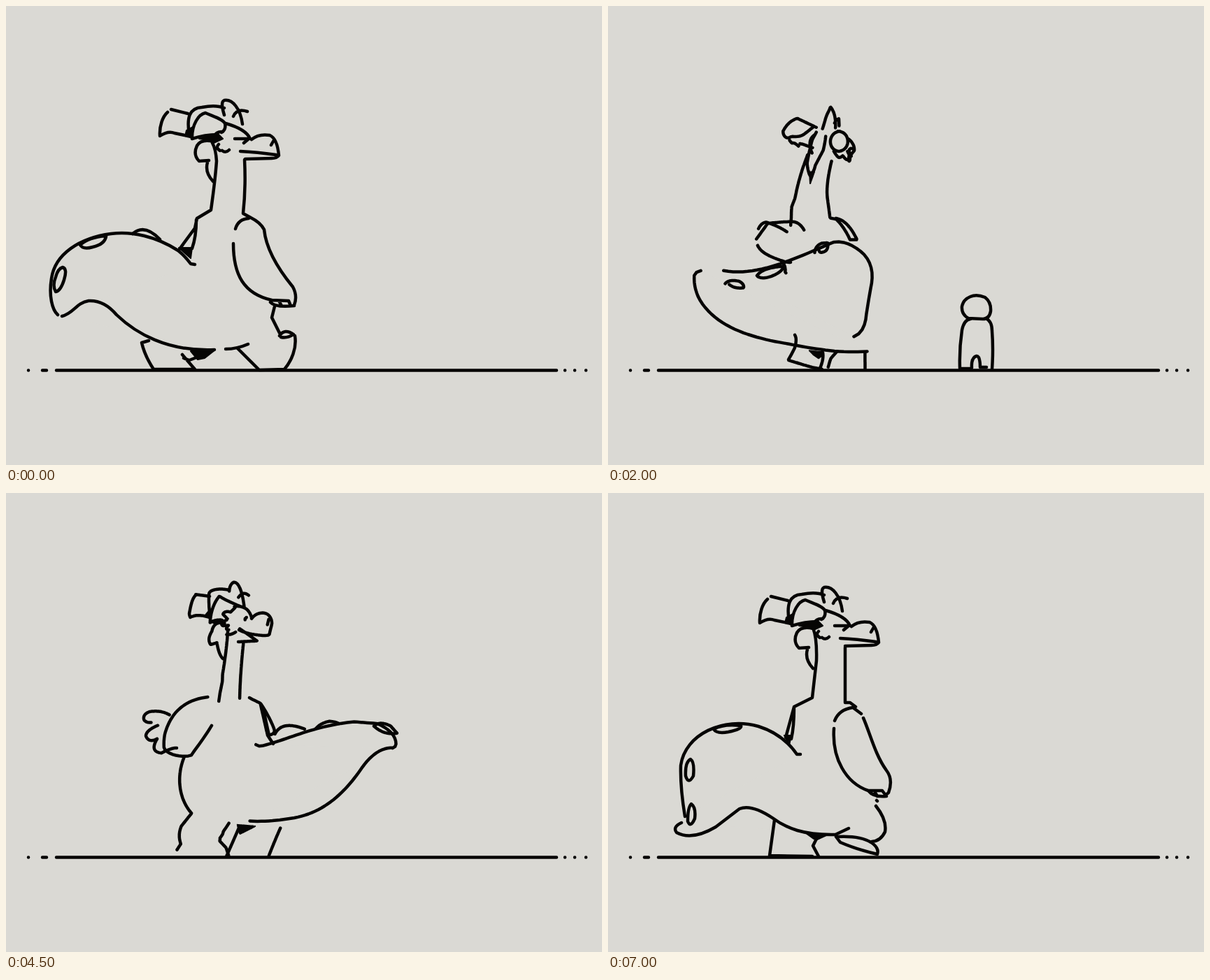
An HTML page that plays this animation: 852 by 657 pixels, repeating every 7160 ms.

```html
<!DOCTYPE html>
<html lang="en">
<head>
<meta charset="utf-8">
<title>Dragon walk</title>
<style>
html, body { margin: 0; height: 100%; overflow: hidden; background: #dad9d4; }
svg { display: block; width: 100%; height: 100%; fill: none; stroke: #060504; stroke-width: 4.5; stroke-linecap: round; stroke-linejoin: round; }
#tail { fill: #dad9d4; }
#ink { fill: #060504; stroke-width: 2; }
</style>
</head>
<body>
<svg viewBox="0 0 852 657">
  <g id="human">
    <path d="M-9,-105Q0,-109 12,-104Q21,-97 20,-84Q18,-73 9,-73L-12,-74Q-22,-80 -21,-91Q-19,-101 -9,-105Z"/>
    <path d="M-9,-73Q-18,-72 -21,-57Q-25,-30 -24,-2L-8,-2M13,-74Q22,-70 22,-56Q24,-30 22,-1"/>
    <path id="feet" d="M-7,-3Q-8,-18 0,-20Q5,-20 5,-4L14,-4"/>
  </g>
  <path id="tail"/><path id="line"/><path id="ink"/>
  <path d="M32,521.5L32.1,521.5M52,521.5L58,521.5M72,521.5L787,521.5M799,521.5L799.1,521.5M813,521.5L813.1,521.5M829,521.5L829.1,521.5"/>
</svg>
<script>
const $ = id => document.getElementById(id);
const STEP = 1000 / 6, LOOP = 7160, SAMPLES = 48;

// Profile head, facing right
const HEAD = 'M260,154L236,148M231,152C224,158 219,172 220,186Q232,178 241,182L260,186' +
  'M262,184C258,160 262,146 280,145Q300,141 312,146M312,156C309,146 307,137 312,135C324,133 335,147 338,169' +
  'M325,158Q330,146 345,151M266,188C266,170 275,155 285,153C296,158 310,162 313,168Q315,177 308,181' +
  'M266,190Q285,184 302,184M314,168C328,172 344,178 349,190M310,180Q301,179 297,187M304,198Q299,203 306,207M309,207Q314,211 319,206' +
  'M296,194Q279,190 273,200Q267,213 276,222L290,221M288,224Q284,238 296,251';
const HEAD_INK = 'M258,178L267,173L266,189L256,186ZM276,190L304,184L310,190L297,196L290,192Z';
const STERN = 'M327,190L345,190M340,196L346,191' +
  'M351,191C357,186 365,183 377,185C386,189 389,203 390,214Q387,218 380,218L342,219M335,208Q358,209 386,213M379,199L383,192';

const place = (d, side, dx, dy) =>
  d.replace(/(-?[\d.]+),(-?[\d.]+)/g, (_, x, y) => `${dx + side * x},${dy + +y}`);

function pose(parts, side, dx, dy) {
  if (side) {
    parts.head = place(HEAD, side, dx, dy);
    parts.headInk = place(HEAD_INK, side, dx, dy);
    parts.face = place(STERN, side, dx, dy);
  }
  for (const key in parts) parts[key] = parts[key].split(/(?=M)/);
  return parts;
}

const contact = pose({
  tail: 'M270,370L264,369Q256,358 246,350C215,330 180,322 150,326C105,332 70,355 65,390C61,415 66,435 74,442' +
    'M80,444C97,440 100,425 118,422C135,421 148,430 158,442C185,468 230,495 298,492M314,491Q330,491 346,484',
  spot: 'M143,330Q141,341 124,345Q110,349 106,342Q118,331 143,329ZM81,374Q88,376 83,392Q78,408 71,409Q66,400 71,388Q74,376 81,374Z' +
    'M181,326Q198,311 220,334',
  neck: 'M295,196Q300,205 301,222C299,250 296,270 293,292L273,304L270,318L248,348M341,220Q343,260 339,297L350,303Q364,310 369,320M272,306Q272,330 266,347',
  arm: 'M328,319Q332,305 347,304M325,340C325,385 340,412 380,421M369,320C372,350 392,380 410,402Q417,415 412,428' +
    'M378,424Q385,432 412,429M380,421L404,422L407,429M390,422L394,429',
  leg: 'M384,430L380,446L391,468M413,472C416,490 408,508 398,520L362,521L331,490M391,472Q398,461 411,470Q402,476 393,474' +
    'M204,479L194,482Q198,500 211,520L270,520L252,499M254,504L262,507L275,502',
  ink: 'M264,494L298,493L284,504L274,506ZM247,346L266,346L264,361Z'
}, 1, 0, 0);

const crouch = pose({
  tail: 'M274,376Q240,347 205,346C170,344 150,354 111,370' +
    'M104,371Q85,365 48,364C36,368 36,400 58,418C80,438 120,436 160,443C200,455 225,490 265,495L287,497',
  spot: 'M131,361Q140,339 172,345M62,363Q70,358 95,366L97,372Q75,377 62,365ZM208,345Q228,329 246,353',
  neck: 'M298,196Q301,210 299,250Q297,285 291,310L270,322L269,350L262,367M339,222Q345,260 341,310L352,316',
  arm: 'M335,324L350,317Q365,318 370,342M329,334Q299,365 318,416M370,342Q364,370 365,405Q355,442 331,444' +
    'M315,425L326,424L330,430L328,440L317,437ZM323,428L319,436',
  leg: 'M370,382Q392,402 383,445Q374,480 356,503L369,519M302,491Q330,502 348,519M331,474Q310,470 295,472Q290,480 287,499' +
    'M245,490L284,519M268,500L296,520',
  ink: 'M244,489L266,495L290,496L288,502L256,500Z'
}, 1, 4, 0);

const passing = pose({
  tail: 'M276,370L270,371Q250,350 230,340C190,322 150,324 130,336Q95,360 70,408' +
    'M56,431Q36,434 40,450Q50,460 80,457C105,452 125,430 152,434C180,440 205,480 266,482',
  spot: 'M103,373Q106,355 132,346Q137,355 120,368Q108,376 103,373ZM59,432Q61,412 80,406Q84,419 67,432Q62,435 59,432ZM173,325Q192,313 215,332',
  neck: 'M293,205Q299,220 297,245Q295,270 291,291L273,302L271,338L259,361M350,228Q344,228 344,235L344,292L352,299',
  arm: 'M333,312Q340,302 352,299Q372,305 377,325M332,321Q321,360 330,393M377,325Q377,350 382,385Q386,410 375,429' +
    'M329,393Q332,412 352,420L366,422L368,428M350,420L366,429',
  leg: 'M380,348C394,380 392,440 372,463Q360,476 346,475M316,462L305,464Q294,470 292,495Q287,510 295,518Q315,524 333,517Q345,500 345,480Q340,462 316,461' +
    'M377,455Q374,490 363,506L342,510M235,481Q238,505 246,520',
  ink: 'M273,484L294,483L291,498Z'
}, 1, -5, 8);

const lift = pose({
  tail: 'M275,374L270,374Q250,345 215,334C165,320 110,345 104,390Q103,420 110,463' +
    'M105,472Q92,478 98,486Q120,498 154,478L188,452Q205,445 235,465C255,480 280,490 325,489M325,489L344,480',
  spot: 'M151,338Q165,330 190,333Q192,338 172,342Q155,345 151,338ZM118,381Q124,385 122,405Q115,418 111,405Q110,385 118,381Z' +
    'M119,445Q126,450 124,466Q118,480 114,470Q114,450 119,445Z',
  neck: 'M293,193Q299,208 298,240L292,293L266,306L254,350M339,221L339,300L346,300L354,306M266,306Q266,335 262,352',
  arm: 'M324,326Q330,310 350,307L362,316M323,337C320,380 340,415 372,426M365,322C375,345 382,375 398,397Q408,410 401,429L396,433' +
    'M372,426Q380,436 398,434L392,426ZM382,429L385,434',
  leg: 'M384,440L385,441M326,492Q360,490 376,500Q388,508 385,517Q355,510 332,500ZM383,448Q399,468 396,485Q390,498 377,499' +
    'M238,468L231,519L292,520M298,495L293,505L301,520',
  ink: 'M283,487L312,490L299,496L294,495ZM252,347L262,347L259,361Z'
}, 1, -3, 0);

const windup = pose({
  tail: 'M145,378C200,390 260,370 345,335Q370,330 400,353Q425,375 418,413L414,455Q414,485 396,492' +
    'M138,379Q128,382 130,390C138,435 185,470 250,486Q310,499 386,494',
  spot: 'M326,350Q326,340 336,336L345,336Q345,350 334,352Q328,354 326,350ZM241,389Q248,376 280,372Q276,383 258,390Q246,394 241,389Z' +
    'M160,406Q165,399 181,403Q189,408 187,414Q170,415 160,406Z',
  head: 'M304,174L273,159Q258,164 250,181Q250,190 258,193L266,190Q280,192 288,186L304,174M264,196Q272,192 274,200' +
    'M276,196Q280,207 288,210M305,176Q313,158 316,142Q324,152 322,172M323,166Q325,161 329,160L327,172' +
    'M303,176L296,190L290,214L285,235Q285,250 288,256Q294,250 295,238L306,210L311,184M300,180Q284,190 289,212',
  face: 'M328,174C349,174 350,206 328,208C308,206 308,176 328,174ZM344,186Q354,195 353,206L345,216L341,208' +
    'M317,208Q320,227 326,215Q334,226 338,210Q341,227 346,214M351,200Q337,198 340,212',
  neck: 'M283,213Q258,255 261,302M316,219Q306,250 308,270L313,300L326,302M326,302Q343,305 356,333L346,333Q338,315 326,303',
  arm: 'M270,318Q260,303 245,305L203,306L183,330M194,314Q204,297 212,297Q232,298 244,304M185,341Q195,356 248,351M236,354L243,373',
  leg: 'M248,487Q251,492 245,505L234,520L294,520M308,497Q306,508 294,520M327,498L320,520M390,497L383,520',
  ink: 'M296,494L312,495L306,505ZM288,235L295,235L289,252Z'
});

const swing = pose({
  tail: 'M332,347Q350,345 372,336Q400,325 403,295Q394,265 405,254' +
    'M411,251C460,258 488,310 488,365Q485,420 449,447M440,455Q425,468 390,477Q340,490 302,480',
  spot: 'M398,272Q390,285 399,297M374,335Q378,325 396,323L390,330Z',
  neck: 'M291,212Q296,250 315,300L334,301L342,325L354,338M251,222Q253,265 259,300',
  arm: 'M258,300L172,308Q165,304 152,303L132,307Q118,322 117,338Q130,362 150,362L168,356L240,363M145,304Q154,300 156,308',
  leg: 'M240,363C232,400 235,440 271,463M270,462L258,460M268,463L245,485Q238,492 243,502L234,520L388,522' +
    'M328,488L299,521M334,490Q322,502 315,521M414,473L388,524',
  ink: 'M330,487L360,484L340,494L330,496Z'
}, -1, 589, 4);

const smile = pose({
  tail: 'M362,365L368,368C420,355 450,335 515,334L555,341Q590,360 586,384L580,388' +
    'M580,388Q545,386 515,418C470,465 430,480 385,478Q350,478 330,474',
  spot: 'M382,361Q395,336 432,348M456,340Q472,325 495,332M526,336Q535,328 550,336L559,346Q540,349 526,336Z',
  head: 'M284,151L256,149M256,149Q247,152 242,176L244,181Q262,176 281,180M286,188Q281,162 285,147Q292,138 327,142' +
    'M327,142Q327,132 334,130Q351,134 357,165M345,152Q354,143 366,150M286,188Q288,165 305,151Q325,160 352,165' +
    'M286,189Q300,184 313,186M336,166Q348,163 360,168Q369,173 372,182M336,166L328,173Q317,170 314,176L321,183' +
    'M321,183Q308,188 314,192L324,191Q317,198 325,198M322,206Q331,206 339,202' +
    'M316,189Q294,186 290,201Q281,212 289,220L302,217M302,219Q304,232 313,238',
  headInk: 'M276,179L285,172L286,184ZM290,187L312,184L314,188L296,190Z',
  face: 'M359,180L360,183M359,181L360,184' +
    'M372,182C378,176 390,171 403,175Q413,180 413,190L409,206Q370,205 349,196M349,196L384,216L356,217M404,191L407,183',
  neck: 'M322,198Q318,235 295,294M356,216Q350,260 348,296M348,296L364,304Q378,325 384,342Q384,348 374,349L364,306M374,349L382,361',
  arm: 'M294,294Q262,298 250,325Q242,350 246,374Q255,384 284,381Q298,350 304,330M250,323Q235,315 215,318Q203,322 205,331Q208,336 217,335' +
    'M217,335Q200,342 200,350Q204,360 216,354M216,354Q205,372 222,374Q238,366 244,367',
  leg: 'M257,384C245,410 250,440 264,458M264,459L248,480Q242,495 248,510L242,520M328,475Q322,490 312,494L314,505L306,520' +
    'M333,480L318,520M403,478L387,519',
  ink: 'M331,473L356,476L334,487ZM364,308L370,316L377,348L373,348Z'
});

// [step, pose, sway x, sway y] where the sway peaks midway to the next key
const KEYS = [
  [0, contact, 0, 0], [1, crouch, -4, 0], [4, passing, 0, -12], [7, lift, 0, 0],
  [8, contact, 0, 0], [9, crouch, 0, 4], [13, windup, -6, 2], [15, windup, 0, 0],
  [16, windup, 0, 0], [20, swing, 0, 0], [24, swing, 0, -6], [28, smile, 5, -7],
  [32, smile, -3, 3], [34, smile, 0, 0], [39, passing, 0, -12], [42, lift, 0, 0], [43, contact, 0, 0]
];

const probe = document.createElementNS('http://www.w3.org/2000/svg', 'path');
const cache = new Map();
function sample(d) {
  if (!cache.has(d)) {
    probe.setAttribute('d', d);
    const length = probe.getTotalLength();
    cache.set(d, Array.from({ length: SAMPLES + 1 }, (_, i) => probe.getPointAtLength(length * i / SAMPLES)));
  }
  return cache.get(d);
}

function blend(a, b, u, sx, sy) {
  if (!a || !b) {
    if (u < .5 ? !a : !b) return '';
    a = b = a || b;
  }
  const from = sample(a), to = sample(b);
  return 'M' + from.map((p, i) => {
    const x = p.x + (to[i].x - p.x) * u, y = p.y + (to[i].y - p.y) * u;
    const w = Math.min(1, Math.max(0, (500 - y) / 300));
    return `${(x + sx * w).toFixed(1)},${(y + sy * w).toFixed(1)}`;
  }).join('L');
}

function drawDragon(step) {
  const i = KEYS.findLastIndex(key => key[0] <= step);
  const [start, a, sx, sy] = KEYS[i], [end, b] = KEYS[i + 1];
  const p = (step - start) / (end - start), u = p * p * (3 - 2 * p), arc = Math.sin(Math.PI * p);
  const still = p === 0 || (a === b && !sx && !sy);
  const out = { tail: '', line: '', ink: '' };
  for (const part of Object.keys({ ...a, ...b })) {
    const layer = part === 'tail' ? 'tail' : /ink/i.test(part) ? 'ink' : 'line';
    const from = a[part] || [], to = b[part] || [];
    if (still) out[layer] += from.join('');
    else for (let k = 0; k < Math.max(from.length, to.length); k++)
      out[layer] += blend(from[k], to[k], u, sx * arc, sy * arc);
  }
  for (const layer in out) $(layer).setAttribute('d', out[layer]);
}

function drawHuman(tick, step) {
  const flung = Math.max(0, step - 17);
  const walked = Math.max(423, 680 - 25.5 * (tick - 18));
  const stride = walked > 423 ? tick % 2 : 0;
  $('human').style.display = tick < 11 || step > 18 ? 'none' : '';
  $('human').setAttribute('transform',
    `translate(${walked + 260 * flung},${521 - 2 * stride - 60 * flung}) rotate(${60 * flung})`);
  $('feet').setAttribute('transform', `translate(${-3 * stride},0)`);
}

function frame(now) {
  const t = now % LOOP + 7;
  const step = Math.floor(t / STEP), tick = Math.floor(t / (STEP / 2));
  drawDragon(Math.min(step, 42));
  drawHuman(tick, step);
  requestAnimationFrame(frame);
}
requestAnimationFrame(frame);
</script>
</body>
</html>
```
